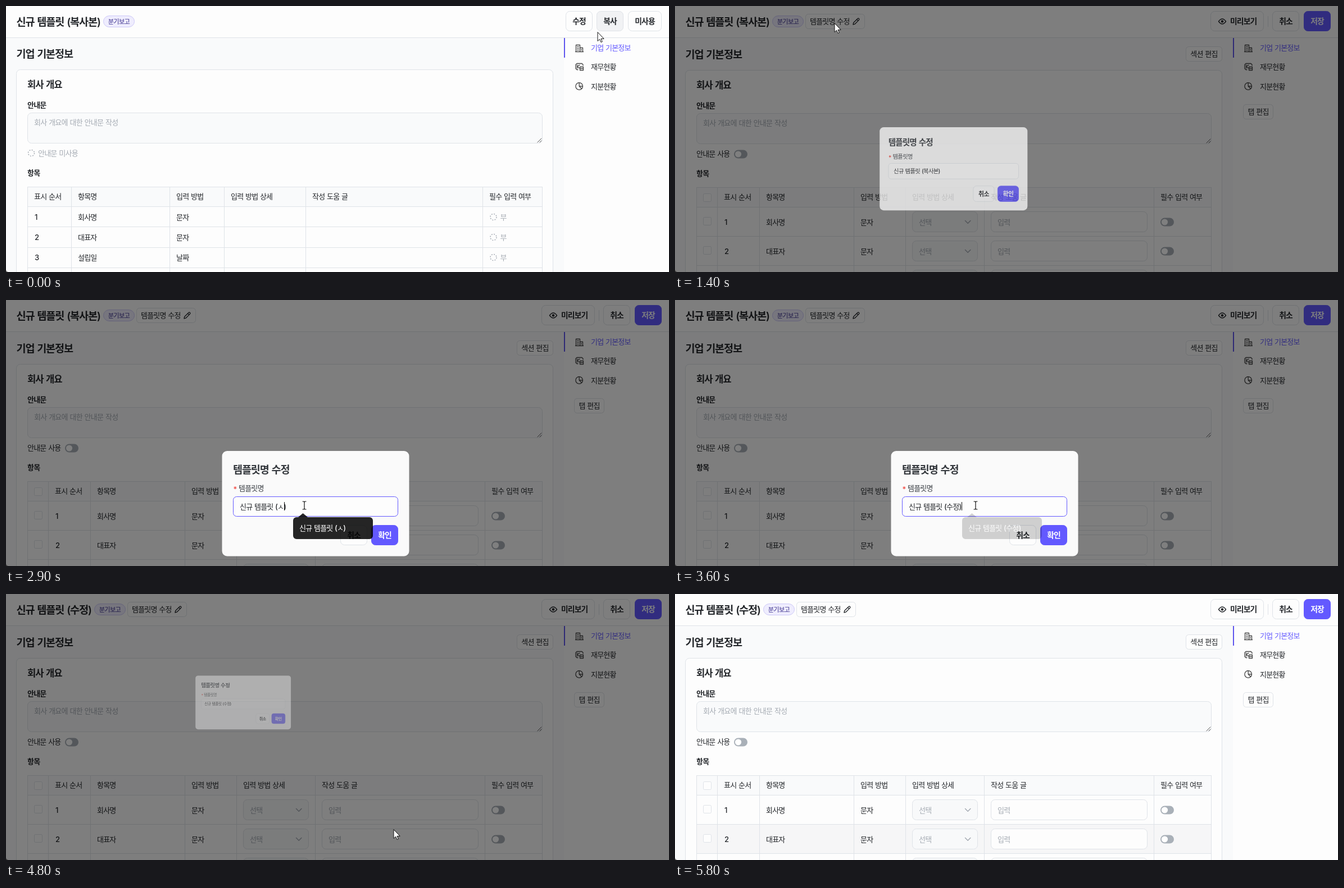
An HTML page that plays this animation: 1180 by 474 pixels, repeating every 5900 ms.

```html
<!DOCTYPE html>
<html lang="ko">
<head>
<meta charset="utf-8">
<title>템플릿명 수정</title>
<style>
  html, body { margin: 0; width: 100%; height: 100%; overflow: hidden; background: #fdfdfd; }
  svg { display: block; width: 100%; height: 100%; }
  text {
    font-family: Inter, "Noto Sans CJK KR", "Noto Sans CJK", "Noto Sans CJK JP", sans-serif;
    letter-spacing: -.06em;
    word-spacing: .07em;
    white-space: pre;
  }
</style>
</head>
<body>
<svg id="stage" viewBox="0 0 1180 474" xmlns="http://www.w3.org/2000/svg"></svg>
<script>
const LOOP = 5900, TICK = 100;
const INK = '#24272b', MUTED = '#a5abb3', LINE = '#dfe3e8', SOFT = '#f9fafb',
      WHITE = '#fdfdfd', PRIMARY = '#6359ff', HOVER = '#f1f2f4', TOGGLE = '#a9b0b8';

// Text is placed by its left edge and vertical centre.
const text = (x, y, str, { size = 13, weight = 500, fill = INK, id = '', anchor = 'start' } = {}) =>
  `<text ${id && `id="${id}"`} x="${x}" y="${y + size * .37}" font-size="${size}" font-weight="${weight}" fill="${fill}" text-anchor="${anchor}">${str}</text>`;
const box = (x, y, w, h, r = 0, fill = WHITE, stroke = LINE, id = '') =>
  `<rect ${id && `id="${id}"`} x="${x + .5}" y="${y + .5}" width="${w - 1}" height="${h - 1}" rx="${r}" fill="${fill}" stroke="${stroke}"/>`;
const path = (d, stroke = INK, width = 1.2, fill = 'none') =>
  `<path d="${d}" fill="${fill}" stroke="${stroke}" stroke-width="${width}" stroke-linecap="round" stroke-linejoin="round"/>`;
const group = (id, body) => `<g id="${id}">${body}</g>`;
const hLine = (x1, x2, y) => `<path d="M${x1} ${y + .5}H${x2}" stroke="${LINE}"/>`;
const vLine = (x, y1, y2) => `<path d="M${x + .5} ${y1}V${y2}" stroke="${LINE}"/>`;

const button = (x, w, label, { id = '', y = 9, h = 36, primary = false } = {}) =>
  box(x, y, w, h, 7, primary ? PRIMARY : WHITE, primary ? PRIMARY : LINE, id) +
  text(x + w / 2, y + h / 2, label, { size: 13.8, weight: 600, fill: primary ? '#fff' : INK, anchor: 'middle' });
const smallButton = (x, y, w, label) =>
  box(x, y, w, 27, 5) + text(x + w / 2, y + 13, label, { anchor: 'middle' });
const toggle = (x, y) =>
  `<rect x="${x}" y="${y - 7.5}" width="24" height="15" rx="7.5" fill="${TOGGLE}"/><circle cx="${x + 7.5}" cy="${y}" r="5.6" fill="#fff"/>`;
const dottedOff = (x, y, label) =>
  `<circle cx="${x + 6.5}" cy="${y}" r="5.5" fill="none" stroke="${MUTED}" stroke-width="1.5" stroke-dasharray="2 2.32"/>` +
  text(x + 18.5, y, label, { fill: MUTED, weight: 400 });
const checkbox = (x, y) => box(x, y, 15, 15, 2);

function grid(cols, rows, labels, inset) {
  const left = cols[0], right = cols.at(-1), [top, second] = rows;
  return `<rect x="${left}" y="${top}" width="${right - left}" height="${second - top}" fill="${SOFT}"/>` +
    rows.map(y => hLine(left, right + 1, y)).join('') +
    cols.map(x => vLine(x, top, 476)).join('') +
    labels.map((s, i) => s && text(cols[i] + inset, (top + second) / 2, s)).join('');
}

const LABELS = ['표시 순서', '항목명', '입력 방법', '입력 방법 상세', '작성 도움 글', '필수 입력 여부'];
const ITEMS = [['회사명', '문자'], ['대표자', '문자'], ['설립일', '날짜']];

const viewTable = () =>
  dottedOff(38.5, 263, '안내문 미사용') +
  grid([38, 116, 291, 388, 533, 848, 954], [323, 358, 394, 431, 467], LABELS, 12) +
  ITEMS.map(([name, kind], i) => {
    const y = 377 + 36 * i;
    return text(51, y, i + 1) + text(128, y, name) + text(303, y, kind) + dottedOff(861, y, '부');
  }).join('');

const editTable = () =>
  text(38, 263, '안내문 사용') + toggle(105, 264) + smallButton(909, 72, 65, '섹션 편집') +
  `<rect id="rowHover" x="38" y="411" width="917" height="51" fill="#f6f6f7"/>` +
  grid([38, 75, 150, 318, 410, 550, 852, 954], [323, 358, 410, 462], ['', ...LABELS], 12) +
  checkbox(50, 334) +
  ITEMS.map(([name, kind], i) => {
    const y = 385 + 52 * i;
    return checkbox(50, y - 9) + text(88, y, i + 1) + text(162, y, name) + text(330, y, kind) +
      box(422, y - 19, 117, 37, 7, '#f8f9fa') + text(434, y, '선택', { fill: MUTED, weight: 400 }) +
      path(`M516.5 ${y - 2.5}l4.7 4.7l4.7 -4.7`, MUTED, 1.5) +
      box(562, y - 19, 279, 37, 7) + text(574, y, '입력', { fill: MUTED, weight: 400 }) + toggle(864, y);
  }).join('');

const section = () =>
  text(18.5, 86, '기업 기본정보', { size: 18.5, weight: 600 }) +
  box(18, 114, 956, 400, 7) +
  text(38, 141, '회사 개요', { size: 16.6, weight: 600 }) +
  text(38, 177, '안내문', { weight: 600 }) +
  box(38, 191, 917, 55, 7, SOFT) +
  text(50, 208, '회사 개요에 대한 안내문 작성', { fill: MUTED, weight: 400 }) +
  path('M946 244L953 237M950 244L953 241', '#555', 1) +
  text(38, 298, '항목', { weight: 600 }) +
  group('viewBody', viewTable()) + group('editBody', editTable());

const sidebar = () =>
  `<rect x="993" y="57" width="187" height="417" fill="${WHITE}"/><rect x="993" y="57" width="2" height="35" fill="#5f55ee"/>` +
  path('M1014.5 81.5V69.5H1021.5V81.5M1021.5 74.5H1026.5V81.5M1013.5 81.5H1027.5M1017 72.5H1019M1017 75.5H1019M1017 78.5H1019M1024 77V79', '#444', 1.3) +
  path('M1018 113.5H1016L1014 111.5V104.5L1016 102.5H1025L1027 104.5V106M1016.5 105V111M1021 105.5A2.5 2.5 0 1 0 1020 110.5M1021.5 108.5H1027.5V114.5H1021.5ZM1021.5 111.5H1027.5', '#444', 1.3) +
  path('M1026.5 143A6.3 6.3 0 1 1 1020.2 136.7V143ZM1020.2 136.7A6.3 6.3 0 0 1 1026.5 143M1020.2 143L1024.6 147.5', '#444', 1.3) +
  text(1041, 74, '기업 기본정보', { fill: PRIMARY }) + text(1041, 108.5, '재무현황') + text(1041, 143, '지분현황') +
  group('tabEdit', smallButton(1011, 175, 54, '탭 편집'));

const header = () =>
  `<rect width="1180" height="57" fill="${WHITE}"/>` + hLine(0, 1180, 56) +
  text(18.5, 28, '', { size: 18.6, weight: 600, id: 'title' }) +
  group('titleTools',
    box(173, 17, 56, 21, 10.5, '#efedfe', '#cdc8f8') +
    text(201, 27.5, '분기보고', { size: 11.2, fill: '#3a2f8c', anchor: 'middle' }) +
    group('renameButton', box(232, 14, 106, 27, 5, WHITE, LINE, 'renameBox') + text(240, 27, '템플릿명 수정') +
      path('M317 33l.7-3.2l7.3-7.3a1.6 1.6 0 0 1 2.4 2.4l-7.3 7.3zM323.5 24l2.4 2.4', INK, 1.3))) +
  group('viewActions', button(996, 48, '수정', { id: 'editBox' }) + button(1051, 48, '복사', { id: 'copyBox' }) + button(1107, 60, '미사용')) +
  group('editActions',
    box(953, 9, 95, 36, 7, WHITE, LINE, 'previewBox') + text(988, 27, '미리보기', { size: 13.8, weight: 600 }) +
    path('M967.5 27.5Q974 18.5 980.5 27.5Q974 36.5 967.5 27.5Z', INK, 1.4) +
    `<circle cx="974" cy="27.5" r="2.3" fill="${INK}"/>` + vLine(1055, 18, 37) +
    button(1063, 48, '취소') + button(1119, 48, '저장', { primary: true }));

const modal = () =>
  `<rect x="384.5" y="269" width="333" height="187.5" rx="9" fill="#fafafa"/>` +
  text(404, 302, '템플릿명 수정', { size: 18.5, weight: 600, fill: '#33373c' }) +
  text(404.5, 337, '*', { fill: '#f0443c' }) + text(414, 335, '템플릿명', { fill: '#3c4046' }) +
  box(404, 350, 294, 36, 6, WHITE, LINE, 'field') +
  text(416, 368, '', { id: 'value' }) + `<rect id="caret" y="360" width="1" height="15" fill="#111"/>` +
  button(595, 48, '취소', { y: 401 }) + button(650, 48, '확인', { y: 401, primary: true }) +
  group('tooltip', `<path d="M517 387H520L528.5 380L537 387H647a6 6 0 0 1 6 6V420a6 6 0 0 1 -6 6H517a6 6 0 0 1 -6 -6V393a6 6 0 0 1 6 -6Z" fill="#000" fill-opacity=".85"/>` +
    text(522, 406, '', { id: 'tipText', fill: '#fff' }));

const pointers = () =>
  group('arrow', path('M0 0V15.5L3.6 12.2L6 17.6L8.3 16.6L6 11.4H10.8Z', '#111', 1, '#fff')) +
  group('hand', path('M-1.5 1.5Q0 -1.2 1.5 1.5V7Q3.2 5.5 4.3 7.3Q6 6.3 7 8Q9.2 7.2 9.3 9.5V13Q9 16 7.5 19H-2L-6.3 12.5Q-7 10 -4.5 10.5L-1.5 13Z', '#111', 1, '#fff') + path('M1.5 7V10M4.3 7.5V10M7 8.2V10', '#111', .8)) +
  group('beam', path('M-3 -7H-1L0 -6L1 -7H3M0 -6V6M-3 7H-1L0 6L1 7H3', '#111', 1.2));

const stage = document.getElementById('stage');
stage.innerHTML =
  `<rect width="1180" height="474" fill="${SOFT}"/>` + group('section', section()) + sidebar() + header() +
  `<path d="M0 470Q.5 473.5 4 474H0Z" fill="#666"/>` +
  `<rect id="mask" width="1180" height="474" fill="#000"/>` + group('modal', modal()) + group('cursor', pointers());

const el = {};
stage.querySelectorAll('[id]').forEach(node => el[node.id] = node);
const show = (id, on) => el[id].setAttribute('display', on ? 'inline' : 'none');
const set = (id, name, value) => el[id].setAttribute(name, value);

// Steps: [time, ...values]
const CURSOR = [
  [0, 1053, 47, 'arrow'], [100, 1047, 40, 'arrow'], [200, 1030, 28, 'hand'], [300, 1020, 25, 'hand'],
  [800, 1015, 35, 'hand'], [900, 960, 48, 'arrow'], [1300, 289, 14, 'hand'], [1400, 284, 31, 'arrow'],
  [1700, 528, 284, 'arrow'], [1800, 531, 366, 'beam'], [3500, 531, 366, 'beam'], [3600, 535, 366, 'beam'],
  [3700, 560, 392, 'arrow'], [4000, 722, 411, 'arrow'], [4100, 741, 425, 'arrow'], [4200, 738, 425, 'arrow'],
  [4400, 690, 420, 'hand'], [4700, 690, 420, 'arrow'], [5100, 690, 420, 'none']
];
const ZOOM = [[0, .2, 0], [1400, .79, .75], [1500, .97, .97], [1600, 1, 1], [4700, .96, .97], [4800, .51, .4], [4900, .23, .04], [5000, .2, 0]];
const MASK = [[0, 0], [1400, .5], [4900, .3], [5000, .12], [5100, 0]];
const TYPED = [[0, '복사본'], [2500, '복사'], [2600, '복'], [2700, ''], [2900, 'ㅅ'], [3000, '수'], [3100, '숮'], [3200, '수저'], [3300, '수정']];
const TOOLTIP = [[0, 0], [2600, .4], [2700, 1], [3500, .6], [3600, .2], [3700, 0]];

const at = (steps, t) => steps.findLast(step => step[0] <= t);
function cursorAt(t) {
  const i = CURSOR.findLastIndex(step => step[0] <= t);
  const [t0, x0, y0, kind] = CURSOR[i], [t1, x1, y1] = CURSOR[i + 1] || [LOOP, x0, y0];
  const p = (t - t0) / (t1 - t0), k = p * p * (3 - 2 * p);
  return [x0 + (x1 - x0) * k, y0 + (y1 - y0) * k, kind];
}

function draw(t) {
  const editing = t >= 700;
  set('section', 'transform', `translate(0 ${editing ? 0 : -1})`);
  for (const id of ['viewBody', 'viewActions']) show(id, !editing);
  for (const id of ['editBody', 'editActions', 'tabEdit', 'renameButton']) show(id, editing);

  const renamed = t >= 4700;
  el.title.textContent = `신규 템플릿 (${renamed ? '수정' : '복사본'})`;
  set('titleTools', 'transform', `translate(${renamed ? -16 : 0} 0)`);
  set('copyBox', 'fill', t < 200 ? HOVER : WHITE);
  set('editBox', 'fill', t >= 200 ? HOVER : WHITE);
  set('previewBox', 'fill', t < 900 ? HOVER : WHITE);
  set('renameBox', 'fill', t === 1300 ? HOVER : WHITE);
  show('rowHover', t >= 5000);

  set('mask', 'opacity', at(MASK, t)[1]);
  const [, scale, opacity] = at(ZOOM, t);
  show('modal', opacity > 0);
  set('modal', 'opacity', opacity);
  set('modal', 'transform', `translate(288 17) scale(${scale}) translate(-288 -17)`);

  const value = `신규 템플릿 (${at(TYPED, t)[1]})`;
  el.value.textContent = el.tipText.textContent = value;
  set('field', 'stroke', t >= 1900 && t < 4700 ? PRIMARY : LINE);
  const caretOn = (t >= 2000 && t < 4100) || (t >= 4400 && t < 4600);
  show('caret', caretOn);
  if (caretOn) {
    const atEnd = t < 2200 || t >= 3500;
    set('caret', 'x', Math.round(416 + el.value.getSubStringLength(0, value.length - (atEnd ? 0 : 1)) + 1));
  }
  set('tooltip', 'opacity', at(TOOLTIP, t)[1]);

  const [x, y, kind] = cursorAt(t);
  set('cursor', 'transform', `translate(${x} ${y})`);
  for (const id of ['arrow', 'hand', 'beam']) show(id, id === kind);
}

function frame() {
  draw(Math.floor(performance.now() % LOOP / TICK) * TICK);
  requestAnimationFrame(frame);
}
frame();
</script>
</body>
</html>
```
